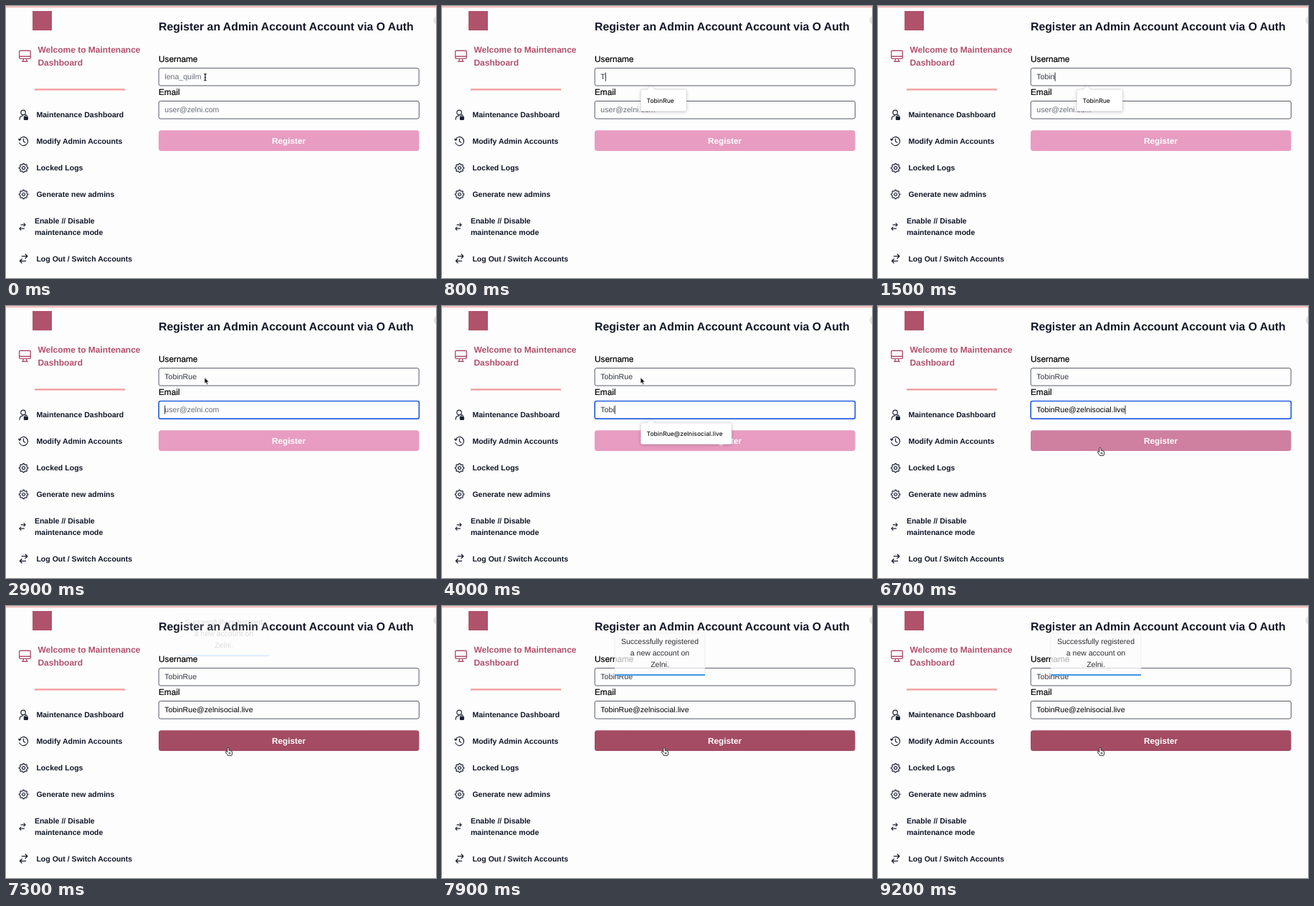
Animation, 600 px wide and 379 px high, one loop 9.3 s. Source, as an HTML page:

```html
<!DOCTYPE html>
<html lang="en">
<head>
<meta charset="utf-8">
<title>Admin registration</title>
<style>
html, body { margin: 0; width: 100%; height: 100%; overflow: hidden; background: #fefdfe; }
svg { display: block; width: 100%; height: 100%; }
text { font-family: "Liberation Sans", Arial, sans-serif; white-space: pre; text-rendering: geometricPrecision; }
.nav { font-weight: 700; font-size: 10.55px; fill: #111827; }
.head { font-weight: 700; font-size: 12px; fill: #b0506c; }
.label { font-size: 11.8px; fill: #000; stroke: #000; stroke-width: .2; }
.field { font-size: 10.6px; }
.box { fill: #fefdfe; }
.icon { fill: none; stroke: #1b2130; stroke-width: 1.2; stroke-linecap: round; stroke-linejoin: round; }
.popup text { font-family: Inter, "Open Sans", sans-serif; font-size: 8.55px; font-weight: 500; fill: #18181b; }
.popup path { fill: #fff; stroke: #dcdce0; stroke-width: .6; filter: drop-shadow(0 1px 2px rgba(0,0,0,.22)); }
.toast text { font-size: 10.5px; fill: #2c2c30; text-anchor: middle; }
</style>
</head>
<body>
<svg viewBox="0 0 600 379" preserveAspectRatio="none">
  <defs>
    <path id="gear"/>
    <path id="swap" d="M-4.5 3H3M-2 .5L-4.5 3L-2 5.5M-2 -3H5M2.5 -5.5L5 -3L2.5 -.5"/>
  </defs>
  <rect width="600" height="379" fill="#fefdfe"/>
  <rect y=".5" width="600" height="1.5" fill="#f0a8a2"/>
  <circle cx="603" cy="20" r="6.5" fill="#e2e2e5"/>
  <rect x="37" y="7" width="27" height="27" fill="#b0526b"/>

  <g class="icon" style="stroke:#b0506c;stroke-width:1.4">
    <rect x="18.6" y="62.2" width="15.6" height="11.2" rx="1.4"/>
    <path d="M18.6 70.2H34.2M24.5 73.6L23.6 77.2H29.2L28.3 73.6M22.6 77.4H30.2"/>
  </g>
  <text class="head" x="44.4" y="65.3">Welcome to Maintenance</text>
  <text class="head" x="44.4" y="83.4">Dashboard</text>
  <rect x="40" y="115.1" width="126" height="2.5" fill="#f0a3a0"/>

  <g class="icon">
    <circle cx="24" cy="148.4" r="3.2"/>
    <path d="M19 158.2C19 154.6 21 152.9 24 152.8"/>
    <rect x="25.3" y="154.5" width="5" height="3.8" rx=".5" fill="#1b2130"/>
    <path d="M26.4 154.3V153.2a1.4 1.4 0 0 1 2.8 0V154.3"/>
    <path d="M18.8 190.6A6 6 0 1 0 18.8 186.4M17.6 185.2L18.7 187.2L20.7 186.1M24.4 185.1V188.8L26.8 190.2"/>
    <g transform="translate(24.5 225.7)"><use href="#gear"/><circle r="2"/></g>
    <g transform="translate(24.5 262.5)"><use href="#gear"/><circle r="2"/></g>
    <use href="#swap" transform="translate(22.7 307.5) scale(.88)"/>
    <use href="#swap" transform="translate(24.3 352) scale(1.1)"/>
  </g>
  <g class="nav">
    <text x="42.4" y="155.3">Maintenance Dashboard</text>
    <text x="42.4" y="192.4">Modify Admin Accounts</text>
    <text x="42.4" y="229.3">Locked Logs</text>
    <text x="42.4" y="266.1">Generate new admins</text>
    <text x="39.9" y="302.8">Enable // Disable</text>
    <text x="39.9" y="318.6">maintenance mode</text>
    <text x="42.4" y="355.6">Log Out / Switch Accounts</text>
  </g>

  <text x="213" y="33.6" font-size="15.8" font-weight="700" fill="#111827">Register an Admin Account Account via O Auth</text>
  <text class="label" x="213" y="78.2">Username</text>
  <text class="label" x="213" y="124.2">Email</text>
  <rect class="box" id="userBox" x="213.2" y="86.6" width="363" height="24.4" rx="2.4"/>
  <rect class="box" id="mailBox" x="213.2" y="132.5" width="363.2" height="24.6" rx="2.4"/>
  <text class="field" id="userText" x="221.3" y="102.2"/>
  <text class="field" id="mailText" x="221.3" y="148.2"/>
  <rect id="caret" width=".9" height="12" fill="#111"/>
  <rect id="button" x="213" y="173.3" width="363.5" height="28.8" rx="3.6"/>
  <text x="394.6" y="191.5" font-size="11.75" font-weight="700" fill="#fff" text-anchor="middle">Register</text>

  <g class="popup" id="userPopup"><path/><text x="285.5" y="134.8"/></g>
  <g class="popup" id="mailPopup"><path/><text x="285.5" y="181.1"/></g>

  <g class="toast" id="toast">
    <rect x="241" y="38" width="126" height="58.5" rx="1.5" fill="#fefdfe" fill-opacity=".74" stroke="#d8d8dc" stroke-opacity=".55" stroke-width=".8"/>
    <text x="304" y="53.3">Successfully registered</text>
    <text x="304" y="69.3">a new account on</text>
    <text x="304" y="85.2">Zelni.</text>
    <rect x="241" y="95" width="126" height="2.2" fill="#459be6"/>
  </g>

  <path id="beam" d="M276.2 94.6Q278 94.6 278 96V102.6Q278 104 276.2 104M279.8 94.6Q278 94.6 278 96M278 102.6Q278 104 279.8 104M276.8 99.8H279.2" fill="none" stroke="#111" stroke-width="1.1"/>
  <path id="arrow" d="M0 0V8.8L2 7L3.4 10.2L5 9.5L3.6 6.4H6.3Z" fill="#0a0a0a" stroke="#fff" stroke-width=".8"/>
  <path id="hand" d="M-1.6 -4.2Q-1.4 -5.5 -.3 -5.4Q.6 -5.3 .7 -4V-1.4Q2 -2 2.5 -1Q3.7 -1.4 4 -.3Q5.3 -.4 5.3 1V3Q5.2 4.2 4.4 5.6H-1Q-1.6 4 -3.2 2.3Q-4.8 .4 -3.8 -.1Q-2.9 -.5 -1.6 1Z M.9 1.2V3.6M2.6 1.2V3.6" fill="#fff" stroke="#151515" stroke-width=".9" stroke-linejoin="round"/>
</svg>
<script>
const LOOP = 9300, STEP = 100;
const NAME = "TobinRue", MAIL = NAME + "@zelnisocial.live";
const nameKeys = [800, 900, 1000, 1200, 1300, 1700, 1800, 1900];
const mailKeys = [3500, 3700, 3900, 4000, 4200, 4500, 4700, 4900];
const MAIL_FOCUS = 2700, PICK = 6200, HOVER = 6500, CLICK = 7200;
const path = [[5100, 277, 99.5], [5700, 326, 163], [5900, 326, 163], [6200, 322, 176], [6500, 310.4, 202.7]];

const $ = id => document.getElementById(id);
const clamp = v => Math.max(0, Math.min(1, v));
const smooth = v => v * v * (3 - 2 * v);
const show = (id, on) => $(id).setAttribute("visibility", on ? "visible" : "hidden");
const move = (id, x, y) => $(id).setAttribute("transform", `translate(${x} ${y})`);
const typed = (keys, t) => NAME.slice(0, keys.filter(k => k <= t).length);

function mix(a, b, p) {
  return `rgb(${a.map((v, i) => Math.round(v + (b[i] - v) * p))})`;
}

function gearPath() {
  const points = [];
  for (let i = 0; i < 64; i++) {
    const a = i / 32 * Math.PI;
    const r = 5.5 + 0.7 * Math.tanh(2 * Math.cos(8 * a));
    points.push(`${(r * Math.cos(a)).toFixed(2)} ${(r * Math.sin(a)).toFixed(2)}`);
  }
  return `M${points.join("L")}Z`;
}

function buildPopup(id, y, right, height, label) {
  const [shape, text] = $(id).children;
  shape.setAttribute("d", `M279 ${y}H286L291.5 ${y - 5}L297 ${y}H${right - 2}q2 0 2 2V${y + height - 2}q0 2 -2 2H279.5q-2 0 -2 -2V${y + 2}q0 -2 2 -2Z`);
  text.textContent = label;
}

function setField(id, value, hint, color) {
  $(id).textContent = value || hint;
  $(id).setAttribute("fill", value ? color : "#666c78");
}

function setBorder(id, focused) {
  $(id).setAttribute("stroke", focused ? "#2560de" : "#565c68");
  $(id).setAttribute("stroke-width", focused ? 1.7 : 1);
}

function pointer(t) {
  let [t0, x0, y0] = path[0];
  for (const [t1, x1, y1] of path) {
    if (t < t1) {
      const p = smooth(clamp((t - t0) / (t1 - t0)));
      return [x0 + (x1 - x0) * p, y0 + (y1 - y0) * p];
    }
    [t0, x0, y0] = [t1, x1, y1];
  }
  return [x0, y0];
}

function draw(t) {
  const name = typed(nameKeys, t);
  const mail = t >= PICK ? MAIL : typed(mailKeys, t);
  const inMail = t >= MAIL_FOCUS && t < CLICK;
  setField("userText", name, "lena_quilm", "#303643");
  setField("mailText", mail, "user@zelni.com", t >= PICK ? "#000" : "#303643");
  setBorder("mailBox", inMail);

  const active = inMail ? mail : name;
  const width = active ? $(inMail ? "mailText" : "userText").getComputedTextLength() : 0;
  $("caret").setAttribute("x", 221.3 + width);
  $("caret").setAttribute("y", inMail ? 138.6 : 92.7);
  show("caret", t >= 600 && t < CLICK);

  show("userPopup", t >= nameKeys[0] && t < 2200);
  show("mailPopup", t >= mailKeys[0] && t < PICK);

  const hover = clamp((t - HOVER) / 560);
  $("button").setAttribute("fill", mix([232, 156, 193], [163, 76, 100], hover));

  const p = smooth(clamp((t - CLICK) / 400));
  move("toast", 0, -32 * (1 - p));
  $("toast").setAttribute("opacity", p);

  const [x, y] = pointer(t);
  move("arrow", x, y);
  move("hand", x, y);
  show("beam", t < nameKeys[0]);
  show("arrow", t >= 2200 && t < HOVER);
  show("hand", t >= HOVER);
}

$("gear").setAttribute("d", gearPath());
buildPopup("userPopup", 116.5, 341, 30, NAME);
buildPopup("mailPopup", 163, 404, 29.5, MAIL);
setBorder("userBox", false);

const start = performance.now();
function tick(now) {
  const t = Math.max(0, now - start) % LOOP;
  draw(Math.floor(t / STEP) * STEP);
  requestAnimationFrame(tick);
}
draw(0);
requestAnimationFrame(tick);
</script>
</body>
</html>
```
